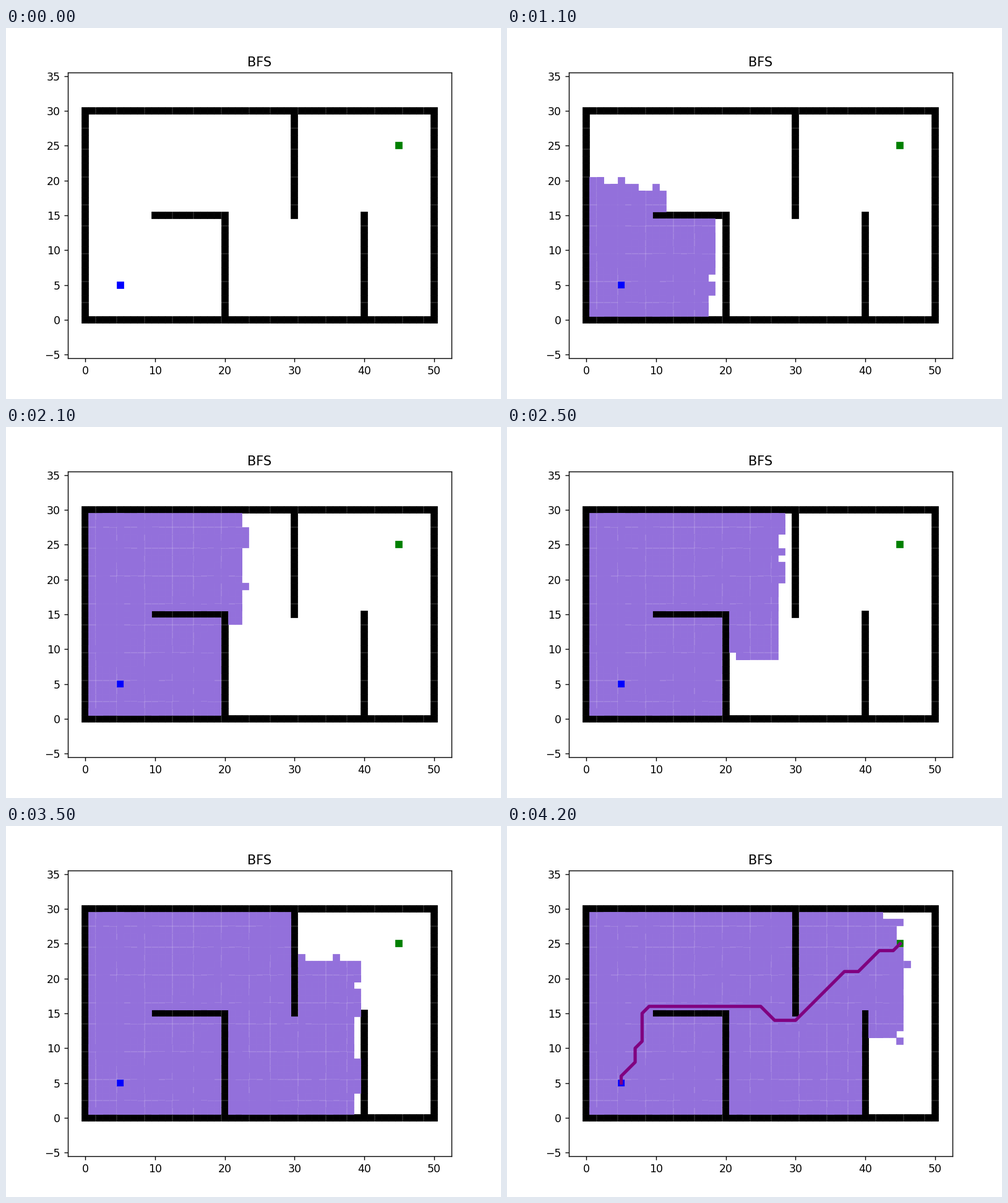
A matplotlib script that plays this animation: 800 px wide and 600 px high, repeating every 4300 ms.

```python
import math
from itertools import product

import matplotlib.pyplot as plt
import numpy as np
from matplotlib.animation import FuncAnimation

STEPS, INTERVAL = 43, 100
START, GOAL = (5, 5), (45, 25)
MOVES = [(-1, 0), (-1, 1), (0, 1), (1, 1), (1, 0), (1, -1), (0, -1), (-1, -1)]
PATH = [(5, 5), (5, 6), (7, 8), (7, 10), (8, 11), (8, 15), (9, 16), (25, 16),
        (27, 14), (30, 14), (37, 21), (39, 21), (42, 24), (44, 24), (45, 25)]


def build_walls():
    walls = {(x, y) for x, y in product(range(51), range(31))
             if x in (0, 50) or y in (0, 30)}
    walls |= {(x, 15) for x in range(10, 21)}
    walls |= {(20, y) for y in range(15)}
    walls |= {(30, y) for y in range(15, 30)}
    walls |= {(40, y) for y in range(16)}
    return walls


# Binary heap on a plain list
def sift(heap, pos):
    item = heap[pos]
    while pos > 0:
        parent = (pos - 1) // 2
        if not item < heap[parent]:
            break
        heap[pos] = heap[parent]
        pos = parent
    heap[pos] = item


def push(heap, item):
    heap.append(item)
    sift(heap, len(heap) - 1)


def pop(heap):
    last = heap.pop()
    if not heap:
        return last
    top, pos, child = heap[0], 0, 1
    while child < len(heap):
        right = child + 1
        if right < len(heap) and not heap[child] < heap[right]:
            child = right
        heap[pos] = heap[child]
        pos, child = child, 2 * child + 1
    heap[pos] = last
    sift(heap, pos)
    return top


def search(walls):
    """Return every visit up to the goal; a cell may come up again."""
    cost = {START: 0}
    queue = [(0, START)]
    visits = []
    while queue:
        _, cell = pop(queue)
        if cell == GOAL:
            break
        visits.append(cell)
        for dx, dy in MOVES:
            near = (cell[0] + dx, cell[1] + dy)
            if near in walls:
                continue
            new_cost = cost[cell] + math.hypot(dx, dy)
            if new_cost < cost.get(near, math.inf):
                cost[near] = new_cost
                rank = queue[-1][0] + 1 if queue else 0
                push(queue, (rank, near))
    return visits[1:]


walls = build_walls()
visits = search(walls)
xs, ys = np.array(visits).T

# Number of different cells covered after each visit
seen = set()
covered = []
for cell in visits:
    seen.add(cell)
    covered.append(len(seen))

# Pace: covered cells at a few steps
key_steps = [0, 6, 11, 17, 25, 35, 41]
key_cells = [0, 168, 300, 472, 707, 1019, len(seen)]

fig, ax = plt.subplots(figsize=(6.4, 4.8), dpi=125)
ax.plot(*zip(*sorted(walls)), "sk")
ax.plot(*START, "bs")
ax.plot(*GOAL, "gs")
visited, = ax.plot([], [], "s", color="mediumpurple")
route, = ax.plot(*zip(*PATH), color="purple", linewidth=3)
ax.set_title("BFS")
ax.axis("equal")


def update(step):
    cells = round(np.interp(step, key_steps, key_cells))
    n = np.searchsorted(covered, cells, side="right")
    visited.set_data(xs[:n], ys[:n])
    route.set_visible(step == STEPS - 1)
    return visited, route


anim = FuncAnimation(fig, update, frames=STEPS, interval=INTERVAL,
                     init_func=lambda: update(0), repeat=True, repeat_delay=0)
plt.show()
```
